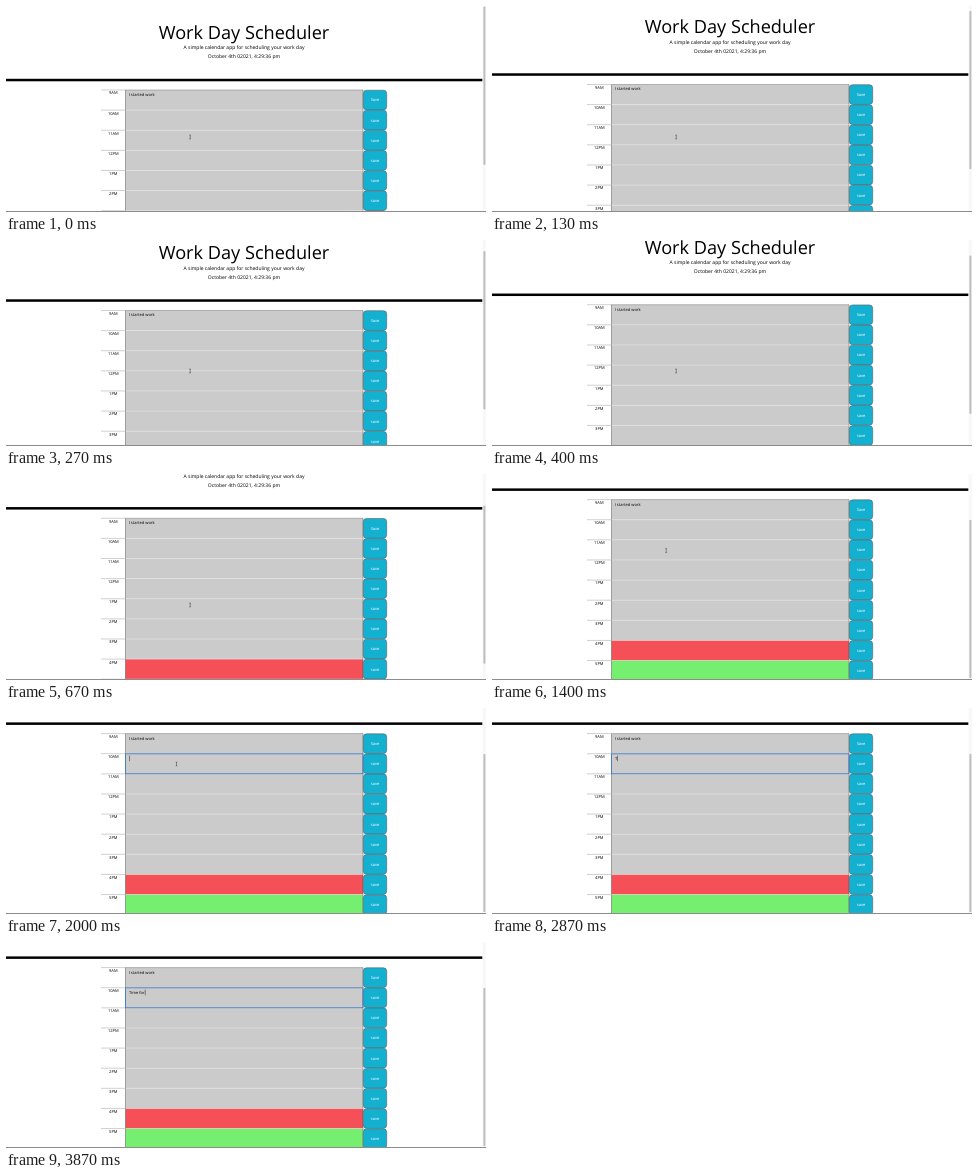
Recreate the animation shown at these times as an HTML page. Size 480x206 px, loop 3990 ms.

```html
<!DOCTYPE html>
<html lang="en">
<head>
<meta charset="utf-8">
<title>Work Day Scheduler</title>
<style>
  html, body { margin: 0; width: 100%; height: 100%; overflow: hidden; background: #fff; }
  svg { display: block; width: 100vw; height: 100vh; }
  text { font-family: "Open Sans", sans-serif; font-size: 4.04px; text-rendering: geometricPrecision; }
  .mid { text-anchor: middle; }
</style>
</head>
<body>
<svg id="stage" viewBox="0 0 480 206" preserveAspectRatio="none"></svg>
<script>
const LOOP = 3990, TICK = 1000 / 15;
const TOP = 84, ROW = 20.12, LEFT = 119.5, RIGHT = 357;
const stage = document.getElementById('stage');

function add(parent, tag, attrs, content = '') {
  const el = document.createElementNS('http://www.w3.org/2000/svg', tag);
  for (const key in attrs) el.setAttribute(key, attrs[key]);
  el.textContent = content;
  return parent.appendChild(el);
}
const rect = (parent, x, y, width, height, fill, more) =>
  add(parent, 'rect', { x, y, width, height, fill, ...more });
const line = (parent, d, stroke, width, more) =>
  add(parent, 'path', { d, stroke, 'stroke-width': width, fill: 'none', ...more });
const label = (parent, x, y, content, size = 4.04, more = { class: 'mid' }) =>
  add(parent, 'text', { x, y, style: `font-size:${size}px`, ...more }, content);

// Page
const page = add(stage, 'g', {});
label(page, 238, 33, 'Work Day Scheduler', 18.15);
label(page, 238, 43.4, 'A simple calendar app for scheduling your work day', 5.03);
label(page, 238, 52.3, 'October 4th 02021, 4:29:36 pm', 5.03);
rect(page, 0, 72.8, 476.5, 2.5, '#000');

['9AM', '10AM', '11AM', '12PM', '1PM', '2PM', '3PM', '4PM', '5PM'].forEach((hour, i) => {
  const y = TOP + i * ROW;
  const fill = i < 7 ? '#cbcbcb' : i === 7 ? '#f54f58' : '#76ee70';
  rect(page, LEFT, y, RIGHT - LEFT, ROW, fill);
  line(page, `M95 ${y}H${LEFT}`, '#888', 0.4);
  line(page, `M${LEFT} ${y}H${RIGHT}`, i ? '#e6e6e6' : '#777', 0.5);
  line(page, `M${LEFT} ${y}v${ROW}M${RIGHT} ${y}v${ROW}`, '#555', 0.5);
  label(page, 107.3, y + 4.4, hour);
  rect(page, RIGHT + 0.3, y + 0.2, 23.4, ROW - 0.4, '#14b0d0',
    { rx: 3.4, stroke: '#5c5f63', 'stroke-width': 0.6 });
  label(page, 369, y + 11.5, i ? 'save' : 'Save', 4.04, { class: 'mid', fill: '#fff' });
});

label(page, 122.7, TOP + 6, 'I started work', 4.04, {});
const rowTwo = TOP + ROW;
const focus = rect(page, LEFT, rowTwo + 0.1, RIGHT - LEFT, ROW - 0.2, 'none',
  { stroke: '#3f7cc4', 'stroke-width': 0.9 });
const typed = label(page, 122.9, rowTwo + 6, '', 4.04, {});
const caret = rect(page, 0, rowTwo + 1.9, 0.5, 5.6, '#222');

// Window frame and pointer
rect(stage, 476.6, 0, 3.4, 206, '#f8f8f8');
const thumb = rect(stage, 477.4, 0.6, 2, 158.4, '#bdbdbd', { rx: 1 });
rect(stage, 0, 205, 480, 1, '#8c8c8c');
const pointer = line(stage, 'M-.8-2.1Q0-2.1 0-1.5V1.5Q0 2.1-.8 2.1M.8-2.1Q0-2.1 0-1.5M0 1.5Q0 2.1.8 2.1', '#333', 0.5);

// [time, value] points joined by straight segments
function follow(points, t) {
  const i = points.findIndex(p => p[0] > t);
  if (i === 0) return points[0][1];
  if (i < 0) return points[points.length - 1][1];
  const [t0, a] = points[i - 1], [t1, b] = points[i];
  return a + (b - a) * (t - t0) / (t1 - t0);
}
const scrollPath = [[0, 0], [67, 1.5], [267, 13.5], [333, 17], [467, 21.5], [533, 21.5],
  [600, 28], [667, 39.7], [733, 52], [800, 58.4]];
const pointerPath = [[1000, 0], [1133, 0.15], [1333, 0.65], [1600, 0.95], [1867, 1]];
const TEXT = 'Time\u00a0for';
const keys = [2733, 3000, 3067, 3200, 3267, 3667, 3733, 3867];
const FOCUS = 2000;

function draw(now) {
  const t = Math.floor((now % LOOP + 4) / TICK) * TICK + 0.5;

  const scroll = follow(scrollPath, t);
  page.setAttribute('transform', `translate(0 ${-scroll})`);
  thumb.setAttribute('y', 0.6 + scroll * 0.775);

  const p = follow(pointerPath, t);
  pointer.setAttribute('transform', `translate(${184.2 - 13.7 * p} ${131 - 75 * p})`);
  pointer.setAttribute('opacity', t < keys[0] ? 1 : 0);

  const count = keys.filter(k => k <= t).length;
  typed.textContent = TEXT.slice(0, count);
  const since = t - (count ? keys[count - 1] : FOCUS);
  const focused = t >= FOCUS;
  focus.setAttribute('opacity', focused ? 1 : 0);
  caret.setAttribute('opacity', focused && since % 1000 < 460 ? 1 : 0);
  caret.setAttribute('x', 123.1 + (count ? typed.getComputedTextLength() : 0));
}

const start = performance.now();
function frame() {
  draw(performance.now() - start);
  requestAnimationFrame(frame);
}
frame();
</script>
</body>
</html>
```
